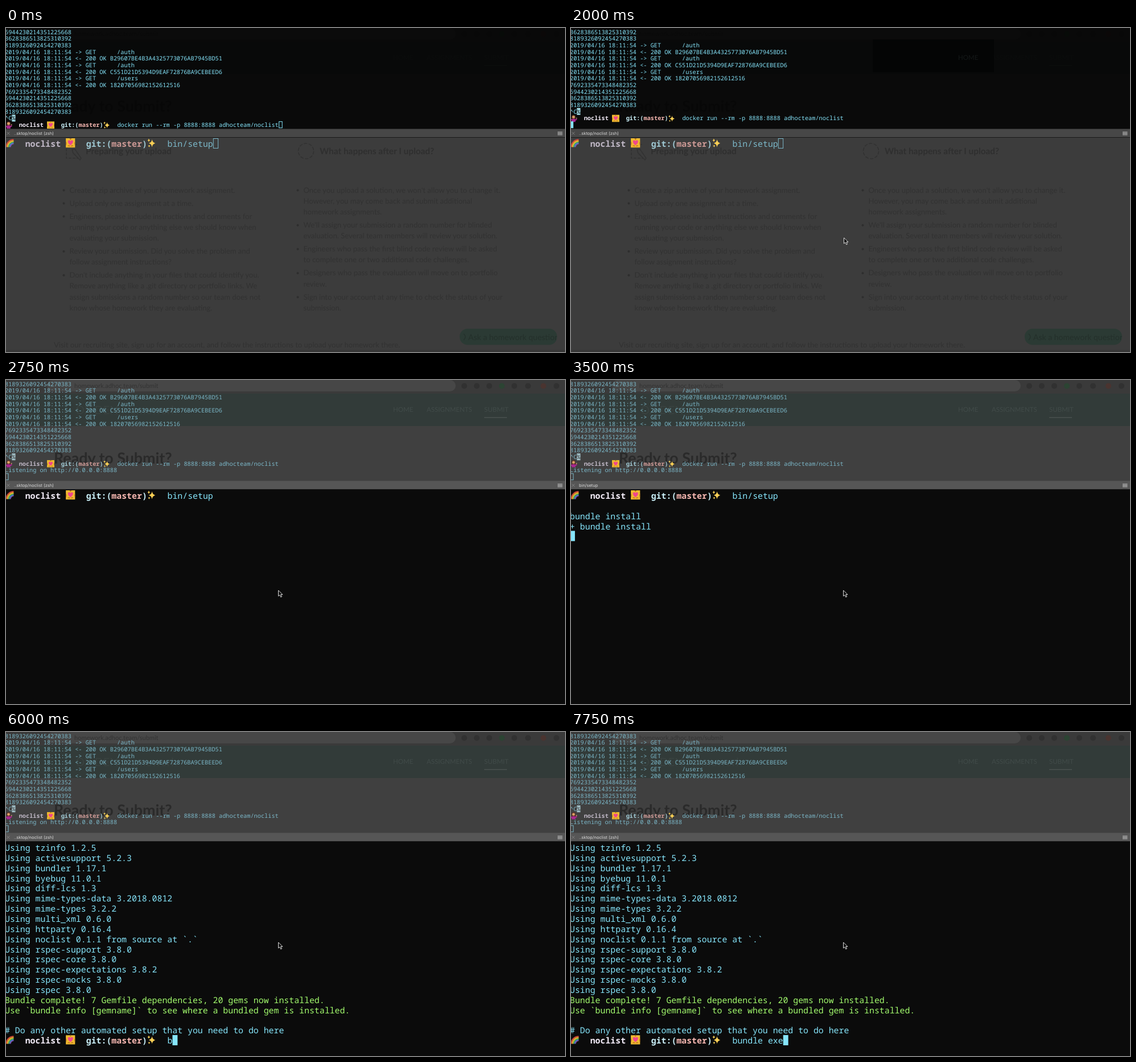
Write an HTML page that moves like this. It is 982 px wide and 570 px high and loops after 8 s.

```html
<!DOCTYPE html>
<html lang="en">
<head>
<meta charset="utf-8">
<title>Terminal session</title>
<style>
html, body { margin: 0; width: 100%; height: 100%; overflow: hidden; background: #0b0b0b; }
svg { display: block; width: 982px; height: 570px; }
svg svg { width: 171px; height: 29px; }
text { white-space: pre; text-rendering: geometricPrecision; }
.mono { font-family: "Noto Sans Mono", "DejaVu Sans Mono", monospace; font-weight: 500; font-variant-ligatures: none; }
.web { font-family: Lato, "Open Sans", sans-serif; font-size: 13.06px; fill: #323232; }
.web .head { font-size: 15.4px; font-weight: 700; fill: #2f2f2f; }
.web .nav { font-size: 11.5px; fill: #414b49; }
.ui { font-family: Inter, "Open Sans", sans-serif; font-size: 7.5px; fill: #dcdcdc; }
</style>
</head>
<body>
<svg viewBox="0 0 982 570" xmlns="http://www.w3.org/2000/svg">
  <defs>
    <symbol id="rainbow" viewBox="0 0 16 16"><g id="bands" fill="none" stroke-width="1.5"></g></symbol>
    <symbol id="couple" viewBox="0 0 16 16">
      <path d="M0 0H16V16H0Z" fill="#efb92f"/>
      <path d="M0 5Q2 7 1 11L0 12ZM16 5Q14 7 15 11L16 12ZM6 0H10L8 3Z" fill="#b8701f"/>
      <path d="M8 12C2 8 3 3 6 3.500Q7.500 3.700 8 5Q8.500 3.700 10 3.500C13 3 14 8 8 12Z" fill="#f0468c"/>
      <path d="M3.500 13.500Q5.500 11.500 7 14M9 14Q10.500 11.500 12.500 13.500" fill="none" stroke="#b4541e"/>
    </symbol>
    <symbol id="sparkles" viewBox="0 0 16 16">
      <path d="M8.500 2Q9.200 7.300 14 8.500 9.200 9.700 8.500 15 7.800 9.700 3 8.500 7.800 7.300 8.500 2ZM3 .5Q3.400 3 5.500 3.500 3.400 4 3 6.500 2.600 4 .5 3.500 2.600 3 3 .5ZM3.500 11Q3.800 12.800 5.500 13.200 3.800 13.600 3.500 15.500 3.200 13.600 1.500 13.200 3.200 12.800 3.500 11Z" fill="#f8cf55"/>
    </symbol>
    <symbol id="shrug" viewBox="0 0 16 16">
      <path d="M4 10V4Q4 .5 8 .5T12 4V10Z" fill="#5a2c22"/>
      <circle cx="8" cy="5" r="3" fill="#d9a066"/>
      <path d="M1 8L4 10 8 8.500 12 10 15 8 15.500 11 12 13V16H4V13L.5 11Z" fill="#a8278f"/>
      <path d="M0 7L3 6 2 9ZM16 7L13 6 14 9Z" fill="#d9a066"/>
    </symbol>
  </defs>
  <g id="topPage" class="web"></g>
  <rect id="topShade" width="982" height="178" fill="#020202" opacity=".86"/>
  <g id="navBlock" class="web">
    <rect x="530" y="20" width="213" height="57.500" fill="#040505"/>
    <text x="680" y="56" class="nav" style="fill:#141818">HOME</text>
  </g>
  <g id="topText" class="mono" font-size="10.28"></g>
  <g id="lowPage" class="web"></g>
  <rect id="lowShade" y="192" width="982" height="378" fill="#0b0b0b"/>
  <g id="lowText" class="mono" font-size="14.87"></g>
  <g class="ui">
    <rect id="bar" y="177.500" width="982" height="15"/>
    <path d="M0 192.500H982" stroke="#1a1a1a"/>
    <path d="M1.500 182.800L6.500 187.800M6.500 182.800L1.500 187.800" stroke="#8c8c8c" stroke-width=".8"/>
    <text id="title" x="14" y="188"></text>
    <path d="M969 183.200H977.500M969 185.500H977.500M969 187.800H977.500" stroke="#d0d0d0"/>
  </g>
  <path id="pointer" d="M0 0V10.200L2.400 8.100 4.200 12 6 11.200 4.300 7.500H7.400Z" fill="#0a0a0a" stroke="#f2f2f2" stroke-width=".9"/>
</svg>
<script>
const LOOP = 8000, STEP = 250, LEFT = -2;
const $ = id => document.getElementById(id);
const esc = s => s.replace(/&/g, "&amp;").replace(/</g, "&lt;");
const label = (x, y, s, attrs = "") => `<text x="${x}" y="${y}" ${attrs}>${esc(s)}</text>`;
const show = (id, on) => { $(id).style.display = on ? "" : "none"; };

const BRIGHT = { text: "#86e5fb", name: "#f3ecf8", git: "#ccf2fb", branch: "#f6b7b1", done: "#a2fa6d", mark: "#a8e4ef", ink: "#0b0b0b" };
const DIM = { text: "#7bb7c8", name: "#c0b8c6", git: "#a0cad5", branch: "#cc9995", done: "#83b868", mark: "#a5c4cc", ink: "#3c3c3c" };
const TOP = { pitch: 6.168, line: 11.67, base: 10.7, top: 0.8, height: 12, lift: 0, icon: 13 };
const LOW = { pitch: 8.922, line: 17.85, base: 209, top: 194, height: 18, lift: 0, icon: 16.5 };

const log = s => "2019/04/16 18:11:54 " + s;
const ids = ["7692335473348482352", "6944230214351225668", "3628386513825310392", "8189326092454270383"];
const topRows = [
  ...ids.slice(1),
  log("-> GET      /auth"), log("<- 200 OK B29607BE4B3A4325773076AB7945BD51"),
  log("-> GET      /auth"), log("<- 200 OK C551D21D5394D9EAF72876BA9CEBEED6"),
  log("-> GET      /users"), log("<- 200 OK 18207056982152612516"),
  ...ids,
  { stop: true },
  { prompt: "docker run --rm -p 8888:8888 adhocteam/noclist", icon: "shrug" }
];
const gems = ["tzinfo 1.2.5", "activesupport 5.2.3", "bundler 1.17.1", "byebug 11.0.1", "diff-lcs 1.3",
  "mime-types-data 3.2018.0812", "mime-types 3.2.2", "multi_xml 0.6.0", "httparty 0.16.4",
  "noclist 0.1.1 from source at `.`", "rspec-support 3.8.0", "rspec-core 3.8.0",
  "rspec-expectations 3.8.2", "rspec-mocks 3.8.0", "rspec 3.8.0"];
const installed = [
  ...gems.map(g => "Using " + g),
  { done: "Bundle complete! 7 Gemfile dependencies, 20 gems now installed." },
  { done: "Use `bundle info [gemname]` to see where a bundled gem is installed." },
  "", "# Do any other automated setup that you need to do here"
];
const shell = cmd => ({ prompt: cmd, icon: "rainbow" });

// Last value whose start time has been reached; keys are [start, value].
const at = (t, keys) => keys.reduce((v, [start, next]) => t >= start ? next : v, keys[0][1]);

function drawRow(row, i, m, c) {
  const y = m.base + i * m.line, top = m.top + i * m.line;
  const x = col => LEFT + col * m.pitch;
  const put = (col, s, fill, bold) => label(x(col), y, s, `fill="${fill}"${bold ? ' font-weight="700"' : ""}`);
  const icon = (id, col) => `<use href="#${id}" x="${x(col)}" y="${top + m.lift}" width="${m.icon}" height="${m.icon}"/>`;
  if (typeof row === "string") return put(0, row, c.text);
  if (row.done) return put(0, row.done, c.done);
  if (row.stop) return put(0, "^C", c.text) +
    `<rect x="${x(2)}" y="${top}" width="${m.pitch}" height="${m.height}" fill="${c.mark}"/>` + put(2, "%", c.ink);
  return icon(row.icon, 0) + put(4, "noclist", c.name, true) + icon("couple", 12) +
    put(16, "git:(", c.git, true) + put(21, "master", c.branch, true) + put(27, ")", c.git, true) +
    icon("sparkles", 28) + put(32, row.prompt, c.text);
}

function drawCursor(kind, col, row, m, c) {
  if (kind === "off") return "";
  const x = LEFT + col * m.pitch, y = m.top + row * m.line;
  if (kind === "full") return `<rect x="${x}" y="${y}" width="${m.pitch}" height="${m.height}" fill="${c.text}"/>`;
  return `<rect x="${x + 0.5}" y="${y + 0.5}" width="${m.pitch - 0.6}" height="${m.height - 1}" fill="none" stroke="${c.text}"/>`;
}

function buildPages() {
  const colors = ["#d3413c", "#e88a2e", "#edd23f", "#58b34e", "#3f8fd8", "#8a56b8"];
  $("bands").innerHTML = colors.map((c, i) => {
    const r = 13 - i * 1.5;
    return `<path d="M${15 - r} 15A${r} ${r} 0 0 1 15 ${15 - r}" stroke="${c}"/>`;
  }).join("");

  const tools = [805, 827, 849, 871, 893, 917, 944, 967];
  const tint = { 871: "#2c4433", 944: "#4a3430" };
  $("topPage").innerHTML =
    `<rect width="982" height="178" fill="#404040"/><rect width="982" height="24" fill="#3a3a3a"/>
     <rect x="72" y="0" width="718" height="20" rx="10" fill="#474747"/>
     <rect y="24" width="982" height="57" fill="#323b39"/>` +
    label(120, 14, "homework.adhoc.team/submit", 'style="font-size:11px" fill="#333"') +
    tools.map(x => `<circle cx="${x}" cy="10.500" r="5" fill="${tint[x] || "#313131"}"/>`).join("") +
    label(122, 60, "OX DEN Homework", 'style="font-size:20px;fill:#3a4341"') +
    label(680, 56, "HOME", 'class="nav"') + label(739, 56, "ASSIGNMENTS", 'class="nav"') +
    label(840, 56, "SUBMIT", 'class="nav"') +
    `<path d="M840 66H880" stroke="#48514f" stroke-width="1.500"/>` +
    label(84, 147, "Ready to Submit?", 'style="font-size:26.8px;font-weight:700;fill:#2a2a2a"');

  // A leading asterisk starts a new bullet.
  const left = `*Create a zip archive of your homework assignment.
*Upload only one assignment at a time.
*Engineers, please include instructions and comments for
running your code or anything else we should know when
evaluating your submission.
*Review your submission. Did you solve the problem and
follow assignment instructions?
*Don't include anything in your files that could identify you.
Remove anything like a .git directory or portfolio links. We
assign submissions a random number so our team does not
know whose homework they are evaluating.`;
  const right = `*Once you upload a solution, we won't allow you to change it.
However, you may come back and submit additional
homework assignments.
*We'll assign your submission a random number for blinded
evaluation. Several team members will review your solution.
*Engineers who pass the first blind code review will be asked
to complete one or two additional code challenges.
*Designers who pass the evaluation will move on to portfolio
review.
*Sign into your account at any time to check the status of your
submission.`;
  const list = (x, src) => {
    let y = 266.5;
    return src.split("\n").map(s => {
      const first = s[0] === "*";
      y += first ? 23 : 19.2;
      return (first ? `<circle cx="${x - 10}" cy="${y - 4}" r="2" fill="#2e2e2e"/>` : "") + label(x, y, s.replace("*", ""));
    }).join("");
  };
  $("lowPage").innerHTML =
    `<rect y="192" width="982" height="378" fill="#3c3c3c"/><rect y="566.500" width="982" height="4" fill="#363636"/>
     <g fill="none" stroke="#323232" stroke-width="1.500">
       <path d="M106 205V229H127M106 205H127" stroke-dasharray="5 2"/><path d="M116 214L121 213 132 229 130 232 118 220Z"/>
       <circle cx="527" cy="216.500" r="13.500" stroke-dasharray="6 2.500"/>
     </g>` +
    label(140, 221.5, "Preparing your upload", 'class="head"') +
    label(551, 221.5, "What happens after I upload?", 'class="head"') +
    list(111.5, left) + list(522.5, right) +
    label(84, 561.5, "Visit our recruiting site, sign up for an account, and follow the instructions to upload your homework there.") +
    `<rect x="797" y="529" width="171" height="28.500" rx="14" fill="#2b3a34"/>
     <path d="M804 538Q810 543 804 549" fill="none" stroke="#24302b" stroke-width="1.300"/>
     <svg x="797" y="529" width="171" height="29">` +
    label(15, 19.5, "Ask a homework question", 'style="font-size:14px;fill:#24302b"') + "</svg>";
}

function render(t) {
  const lowActive = t >= 2250;
  const topColor = lowActive ? DIM : BRIGHT, lowColor = lowActive ? BRIGHT : DIM;

  const scroll = at(t, [[0, 0], [1500, 1], [2750, 2]]);
  const rows = topRows.concat(scroll > 1 ? "Listening on http://0.0.0.0:8888" : []).slice(scroll);
  const topKind = at(t, [[0, "open"], [750, "full"], [1250, "off"], [1500, "full"], [2250, "open"]]);
  $("topText").innerHTML = rows.map((r, i) => drawRow(r, i, TOP, topColor)).join("") +
    drawCursor(topKind, scroll ? 0 : 78, 14, TOP, topColor);

  let low = [shell("bin/setup")], col = 41, row = 0;
  if (t >= 4750) {
    low = installed.slice();
    col = 0;
    row = 19;
    if (t >= 5000) {
      const typed = at(t, [[0, 0], [6000, 1], [6250, 2], [6500, 4], [6750, 6], [7000, 8], [7500, 9], [7750, 10]]);
      low.push(shell("bundle exec".slice(0, typed)));
      col = 32 + typed;
    }
  } else if (t >= 3500) {
    low.push("", "bundle install", "+ bundle install");
    col = 0;
    row = 4;
  }
  const lowKind = at(t, [[0, "open"], [2250, "full"], [2500, "off"], [3000, "full"], [4500, "off"],
    [4750, "full"], [5750, "off"], [6000, "full"]]);
  $("lowText").innerHTML = low.map((r, i) => drawRow(r, i, LOW, lowColor)).join("") +
    drawCursor(lowKind, col, row, LOW, lowColor);

  show("topShade", !lowActive);
  show("lowShade", lowActive);
  show("navBlock", t >= 250 && !lowActive);
  show("pointer", t >= 2000);
  $("bar").setAttribute("fill", lowActive ? "#565656" : "#474747");
  $("title").textContent = at(t, [[0, "..sktop/noclist (zsh)"], [3500, "bin/setup"], [4500, "bin/setup (ruby)"],
    [4750, "..sktop/noclist"], [5250, "..sktop/noclist (zsh)"]]);
  $("pointer").setAttribute("transform", lowActive ? "translate(478.500 370)" : "translate(479.500 369)");
}

buildPages();
const start = performance.now();
let shown = -1;
function tick() {
  const step = Math.floor((performance.now() - start) % LOOP / STEP);
  if (step !== shown) render((shown = step) * STEP);
  requestAnimationFrame(tick);
}
tick();
</script>
</body>
</html>
```
